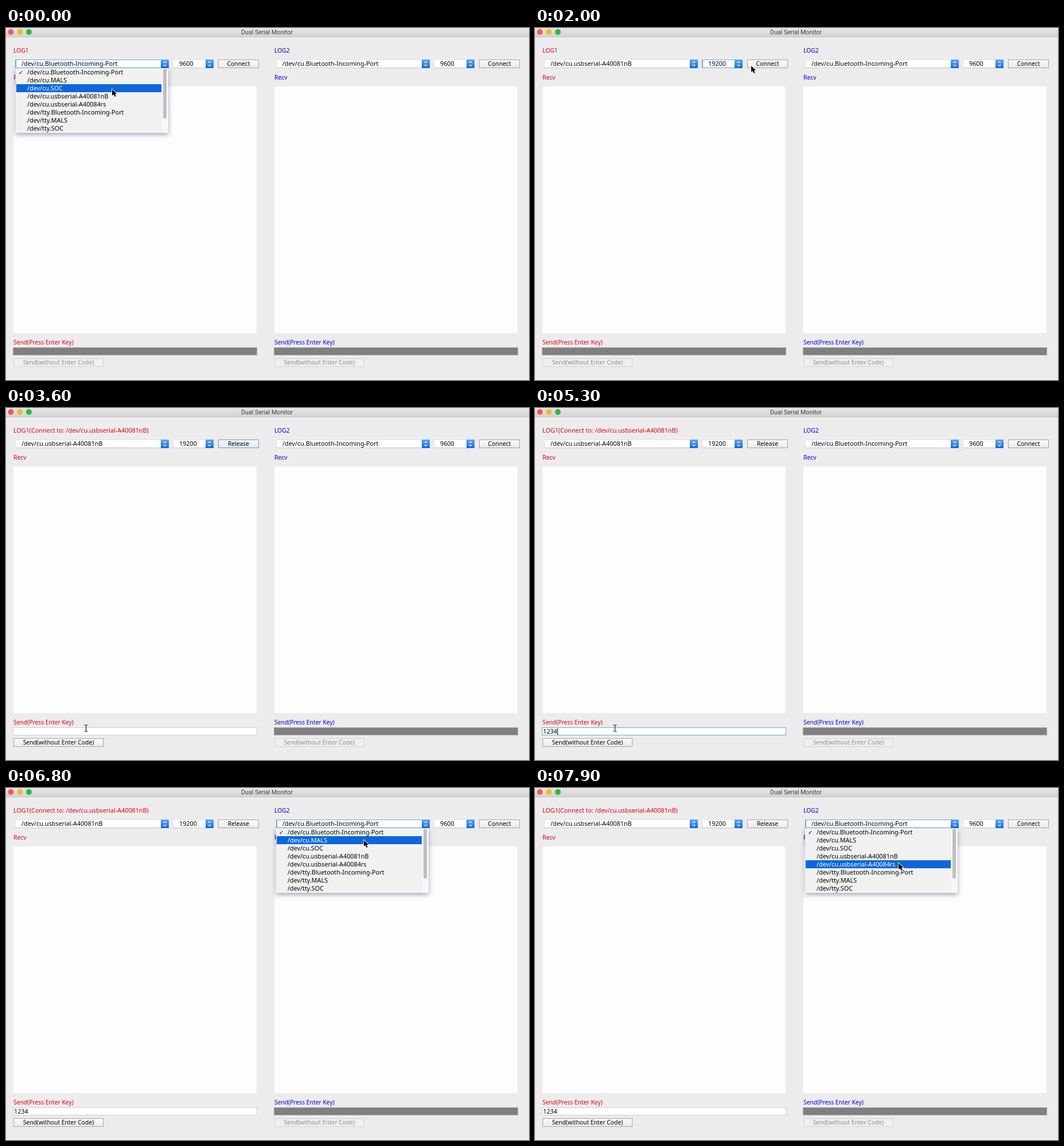
Animation of 912 by 614 pixels, one loop 8000 ms. Source, as an HTML page with a canvas:

```html
<!DOCTYPE html>
<html lang="en">
<head>
<meta charset="utf-8">
<title>Dual Serial Monitor</title>
<style>
html, body { margin: 0; width: 100%; height: 100%; overflow: hidden; background: #ececec; }
canvas { display: block; }
</style>
</head>
<body>
<canvas id="stage" width="912" height="614"></canvas>
<script>
const ctx = document.getElementById('stage').getContext('2d');
const LOOP = 8000, STEP = 100;
const RED = '#dc0010', BLUE = '#0000d4', INK = '#000', FOCUS = '#68a9e2';
const SANS = '"Noto Sans", "Open Sans", sans-serif';
const PORTS = ['cu.Bluetooth-Incoming-Port', 'cu.MALS', 'cu.SOC', 'cu.usbserial-A40081nB',
  'cu.usbserial-A40084rs', 'tty.Bluetooth-Incoming-Port', 'tty.MALS', 'tty.SOC'].map(p => '/dev/' + p);
const RATES = ['9600', '19200', '38400', '57600', '115200'];

// When things happen, in ms
const AT = { pick: 400, rateOpen: 1300, ratePick: 1700, connect: 2500, field: 4000, type: 4600, open2: 6400 };

// Pointer way-points: time, x, y
const PATH = [
  [0, 185, 107], [300, 187, 116], [900, 187, 116], [1200, 353, 63], [1400, 350, 78],
  [1600, 343, 91], [1700, 345, 90], [2000, 377, 66], [2300, 386, 64], [2800, 386, 64],
  [3400, 139, 558], [5500, 139, 558], [6200, 620, 64], [6500, 622, 66],
  [6800, 624, 91], [7200, 626, 94], [7700, 634, 131], [8000, 634, 131]
];

function pointer(t) {
  const i = PATH.findIndex(p => p[0] > t);
  const [t0, x0, y0] = PATH[i - 1], [t1, x1, y1] = PATH[i];
  const u = (t - t0) / (t1 - t0), k = u * u * (3 - 2 * u);
  return [Math.round(x0 + (x1 - x0) * k), Math.round(y0 + (y1 - y0) * k)];
}

function rect(x, y, w, h, fill) {
  ctx.fillStyle = fill;
  ctx.fillRect(x, y, w, h);
}

function frame(x, y, w, h, color) {
  ctx.strokeStyle = color;
  ctx.lineWidth = 1;
  ctx.strokeRect(x + .5, y + .5, w - 1, h - 1);
}

function shade(y, h, top, bottom) {
  const g = ctx.createLinearGradient(0, y, 0, y + h);
  g.addColorStop(0, top);
  g.addColorStop(1, bottom);
  return g;
}

function text(s, x, y, color = INK, size = 10.3, align = 'left', family = SANS, weight = 500) {
  ctx.font = `${weight} ${size}px ${family}`;
  ctx.textAlign = align;
  ctx.fillStyle = color;
  ctx.fillText(s, x, y);
}

function line(points, color, width = 1) {
  ctx.beginPath();
  points.forEach(p => ctx.lineTo(...p));
  ctx.strokeStyle = color;
  ctx.lineWidth = width;
  ctx.stroke();
}

function button(label, x, y, w, on, focused) {
  const fill = focused ? shade(y, 15, '#fafcff', '#dce8f6') : shade(y, 15, '#fcfcfc', '#e9e9ec');
  rect(x, y, w, 15, on ? fill : '#efeff0');
  frame(x, y, w, 15, focused ? '#7596c4' : on ? '#a3a3ad' : '#d0d0d4');
  text(label, x + w / 2, y + 11, on ? INK : '#8c8c8c', 10.3, 'center');
}

function combo(value, x, w, focused) {
  rect(x, 55, w, 15, '#fff');
  frame(x, 55, w, 15, focused ? FOCUS : '#e2e2e5');
  if (focused) rect(x, 55, 2, 15, FOCUS);
  else rect(x, 69, w, 1, '#c4c4ca');
  const bx = x + w - 14, c = bx + 7;
  rect(bx, 55, 14, 15, shade(55, 15, '#58a8f6', '#1268dc'));
  line([[c - 2.5, 61], [c, 58.5], [c + 2.5, 61]], '#fff', 1.2);
  line([[c - 2.5, 64], [c, 66.5], [c + 2.5, 64]], '#fff', 1.2);
  text(value, x + 11, 66, INK, 10.8);
}

function popup(items, x, w, y, scrolls) {
  const h = items.length * 14 + 1, inner = scrolls ? w - 13 : w - 2;
  ctx.save();
  ctx.shadowColor = 'rgba(0,0,60,.35)';
  ctx.shadowBlur = 8;
  ctx.shadowOffsetY = 3;
  rect(x, 70, w, h, '#f1f1f1');
  ctx.restore();
  const hot = Math.floor((y - 70) / 14);
  items.forEach((s, i) => {
    const top = 70 + i * 14, color = i === hot ? '#fff' : INK;
    if (i === hot) rect(x + 1, top, inner, 14, '#0b68da');
    if (!i) text('✓', x + 5, top + 11, color, 10, 'left', '"DejaVu Sans", sans-serif', 'bold');
    text(s, x + 20, top + 11, color, 10.8);
  });
  if (scrolls) {
    rect(x + w - 11, 70, 11, h, '#f7f7f7');
    ctx.fillStyle = '#bfbfc3';
    ctx.beginPath();
    ctx.roundRect(x + w - 9, 71, 6, 87, 3);
    ctx.fill();
  }
}

function sendField(x, p) {
  rect(x, 557, 426, 14, p.on ? '#fff' : '#808080');
  frame(x, 557, 426, 14, p.focus === 'field' ? FOCUS : p.on ? '#cfcfd6' : '#a6a6aa');
  text(p.typed, x + 2, 568, INK, 10.8);
  if (p.caret) rect(Math.round(x + 2 + ctx.measureText(p.typed).width), 559, 1, 11, '#000');
}

function panel(x, color, p) {
  text(p.title, x + 13, 43, color, p.on ? 10.75 : 10.3);
  combo(p.port, x + 16, 268, p.focus === 'port');
  combo(p.rate, x + 291, 71, p.focus === 'rate');
  button(p.on ? 'Release' : 'Connect', x + 370, 55, 71, true, p.focus === 'button');
  text('Recv', x + 13, 90, color);
  rect(x + 13, 102, 424, 430, '#fdfdfd');
  text('Send(Press Enter Key)', x + 13, 552, color);
  sendField(x + 12, p);
  button('Send(without Enter Code)', x + 13, 576, 157, p.on, false);
}

function titleBar() {
  rect(0, 0, 912, 15, shade(0, 15, '#e6e6e6', '#d3d3d3'));
  rect(0, 15, 912, 1, '#c2c2c2');
  ['#fc5650', '#eebb30', '#2dbb3c'].forEach((c, i) => {
    ctx.fillStyle = c;
    ctx.beginPath();
    ctx.arc(8.5 + i * 15.7, 7, 5, 0, 7);
    ctx.fill();
  });
  text('Dual Serial Monitor', 455, 11, '#404040', 10.65, 'center', 'Roboto, sans-serif', 400);
}

function arrow(x, y) {
  ctx.save();
  ctx.translate(x, y);
  ctx.beginPath();
  [[0, 0], [0, 11], [2.6, 8.8], [4.5, 13], [6.6, 12], [4.8, 8], [8.2, 8]].forEach(p => ctx.lineTo(...p));
  ctx.closePath();
  ctx.strokeStyle = '#fff';
  ctx.lineWidth = 1.6;
  ctx.stroke();
  ctx.fillStyle = '#000';
  ctx.fill();
  ctx.restore();
}

function iBeam(x, y) {
  const cx = x + .5;
  line([[cx, y - 5], [cx, y + 6]], '#222', 1.2);
  for (const s of [-1, 1]) {
    const end = y + .5 + s * 6;
    line([[cx - 3, end], [cx, end - s], [cx + 3, end]], '#222', 1.1);
  }
}

function overText(x, y, on) {
  const inBox = left => x >= left && x < left + 424;
  return y >= 102 && y < 532 && (inBox(13) || inBox(468)) || on && y >= 557 && y < 572 && inBox(13);
}

function draw(t) {
  const [x, y] = pointer(t);
  const on = t >= AT.connect;
  const picked = t >= AT.pick;
  const rateOpen = t >= AT.rateOpen && t < AT.ratePick;
  const open2 = t >= AT.open2;
  const focus = open2 ? '' : t >= AT.field ? 'field' : on ? 'button' : t >= AT.rateOpen ? 'rate' : 'port';
  const count = t < AT.type ? 0 : Math.min(4, 1 + Math.floor((t - AT.type) / 200));
  const blink = t < 5400 || Math.floor(t / 500) % 2 === 0;

  rect(0, 0, 912, 614, '#ececec');
  titleBar();
  panel(0, RED, {
    title: on ? `LOG1(Connect to: ${PORTS[3]})` : 'LOG1',
    port: PORTS[picked ? 3 : 0],
    rate: RATES[t >= AT.ratePick ? 1 : 0],
    on, focus,
    typed: '1234'.slice(0, count),
    caret: focus === 'field' && blink
  });
  panel(455, BLUE, {
    title: 'LOG2', port: PORTS[0], rate: RATES[0],
    on: false, focus: open2 ? 'port' : '', typed: '', caret: false
  });
  if (!picked) popup(PORTS, 17, 266, y, true);
  if (rateOpen) popup(RATES, 292, 69, y, false);
  if (open2) popup(PORTS, 471, 266, y, true);

  const menu = !picked || rateOpen || open2;
  (!menu && overText(x, y, on) ? iBeam : arrow)(x, y);
}

const start = performance.now();
function tick() {
  const t = (performance.now() - start) % LOOP;
  draw(Math.floor(t / STEP) * STEP);
  requestAnimationFrame(tick);
}
tick();
</script>
</body>
</html>
```
